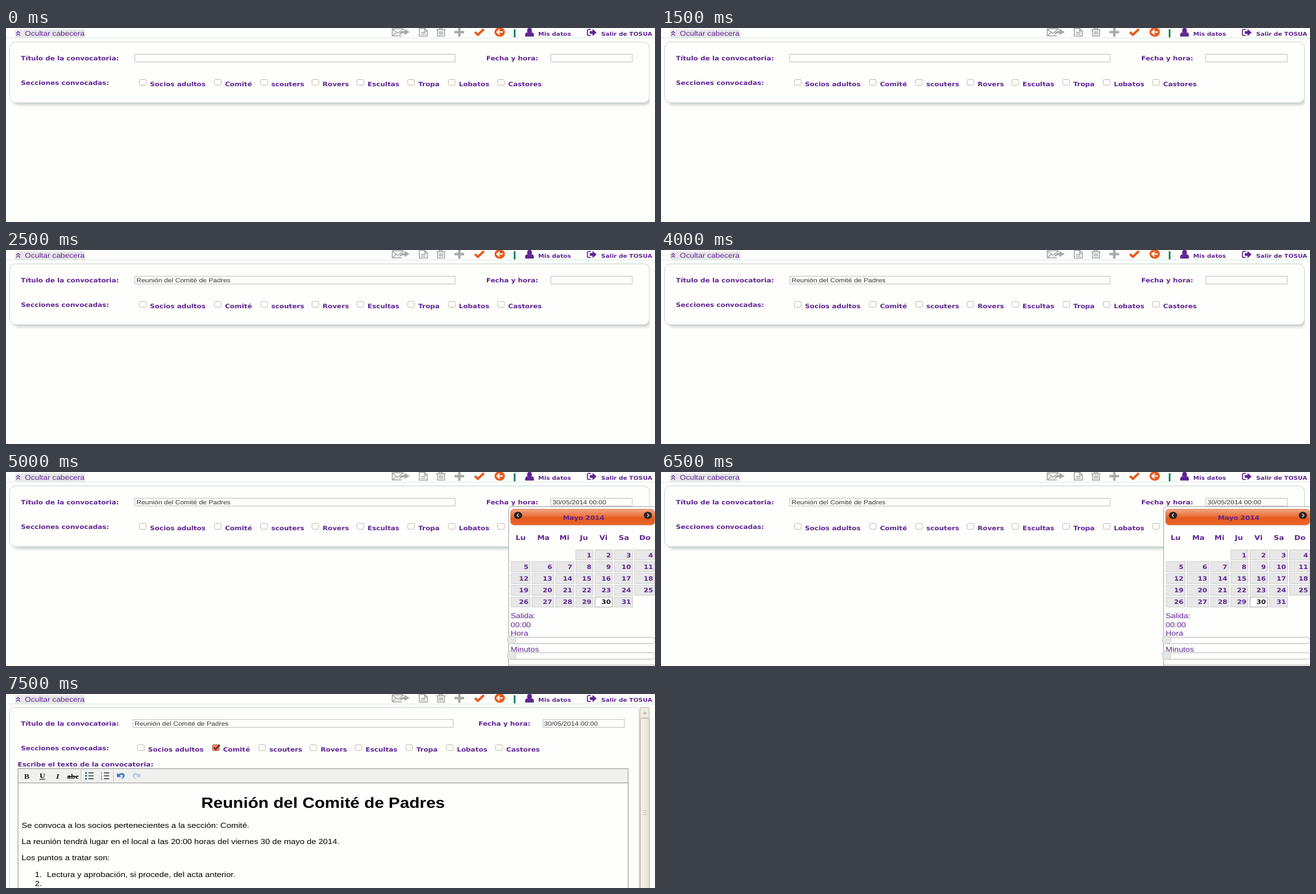
These frames come from a looping animation (1000 px wide and 300 px high, 10000 ms). An HTML page:

```html
<!DOCTYPE html>
<html lang="es">
<head>
<meta charset="utf-8">
<title>Convocatoria</title>
<style>
html, body { margin: 0; width: 100%; height: 100%; overflow: hidden; background: #fefefc; }
svg { display: block; width: 1000px; height: 300px; text-rendering: geometricPrecision; }
.lab { font: bold 10.5px "DejaVu Sans", sans-serif; fill: #5e2692; }
.nav { font: bold 9.3px "DejaVu Sans", sans-serif; fill: #5e2692; }
.th { font: bold 11.5px "DejaVu Sans", sans-serif; fill: #5e2692; }
.tab { font: 12.1px "Liberation Sans", Arial, sans-serif; fill: #5e2692; }
.val { font: 10.65px "Liberation Sans", Arial, sans-serif; fill: #333; }
.time { font: 12.5px "Liberation Sans", Arial, sans-serif; fill: #5e2692; }
.doc { font: 12.95px "Liberation Sans", Arial, sans-serif; fill: #000; }
.h1 { font: bold 26px "Liberation Sans", Arial, sans-serif; fill: #000; }
.tool { font: bold 12px "Liberation Serif", serif; fill: #111; }
.num { font: 5px "DejaVu Sans", sans-serif; fill: #2f5fc0; }
.ital { font-style: italic; }
.mid { text-anchor: middle; }
.end { text-anchor: end; }
.now { fill: #111; }
.scene { animation: 10s step-end infinite; }
#form { animation-name: form; }
#title { animation-name: title; }
#calendar { animation-name: calendar; }
#editor { animation-name: editor; }
@keyframes form { 0% { visibility: visible } 75%, 100% { visibility: hidden } }
@keyframes title { 0% { visibility: hidden } 25% { visibility: visible } 75%, 100% { visibility: hidden } }
@keyframes calendar { 0% { visibility: hidden } 50% { visibility: visible } 75%, 100% { visibility: hidden } }
@keyframes editor { 0% { visibility: hidden } 75%, 100% { visibility: visible } }
</style>
</head>
<body>
<svg viewBox="0 0 1000 300">
  <defs>
    <linearGradient id="orange" x2="0" y2="1">
      <stop offset="0" stop-color="#f3a684"/><stop offset=".45" stop-color="#ea6f3a"/>
      <stop offset=".55" stop-color="#e65a1e"/><stop offset="1" stop-color="#e8642a"/>
    </linearGradient>
    <linearGradient id="thumb">
      <stop offset="0" stop-color="#f7f4ed"/><stop offset="1" stop-color="#e6dfd2"/>
    </linearGradient>
    <filter id="blur" x="-5%" y="-20%" width="110%" height="140%"><feGaussianBlur stdDeviation="2"/></filter>
    <clipPath id="page"><rect width="992" height="300"/></clipPath>
  </defs>
  <rect width="1000" height="300" fill="#fefefc"/>

  <g>
    <path d="M0 15.5H1000" stroke="#dcefe5"/>
    <path d="M14 15V5q0-3 3-3H119q3 0 3 3V15z" fill="#e7e7e9"/>
    <path d="M15.8 8l2.9-2.7L21.6 8M15.8 11.6l2.9-2.7 2.9 2.7" fill="none" stroke="#5e2692" stroke-width="1.2"/>
    <g fill="none" stroke="#a9a9a9" stroke-width="1.5">
      <path d="M610 12.3H595.2V1.2H612V3M595.5 2l8.2 6 8-6M595.5 12l5.5-5"/>
      <path d="M636.8.5V12.5H649.2V4.5L645.2.5zM645 .5V4.8H649M639.5 6.8h7M639.5 9.5h7"/>
      <path d="M663 2.8H677.5M667.5 2.5V.6h5V2.5M665 3V12.4H675.6V3M668 5v5.5M670.3 5v5.5M672.6 5v5.5"/>
      <path d="M691 6.3H706M698.5-1V13.5" stroke-width="3.8"/>
    </g>
    <path d="M606 11q0-6 8-6.4V1.6L622 6.2l-8 4.6V8q-5 0-8 3z" fill="#a9a9a9"/>
    <path d="M722.5 6.2l4.6 4.3 9.2-8.8" fill="none" stroke="#e8591c" stroke-width="3.6"/>
    <ellipse cx="760.7" cy="6.3" rx="8" ry="7.2" fill="#e8591c"/>
    <path d="M765.5 6.3H757M760.6 2.4l-4.1 3.9 4.1 3.9" fill="none" stroke="#fff" stroke-width="2"/>
    <path d="M783.7 2V14.5" stroke="#0b8058" stroke-width="2.6"/>
    <g fill="#5e2692">
      <ellipse cx="806.7" cy="4" rx="3.7" ry="4.2"/>
      <path d="M800 13.3V10.5q0-3.8 3.4-3.8 3.3 2.4 6.6 0 3.4 0 3.4 3.8v2.8z"/>
      <path d="M899.5 4.8h4.2V1.4l6.4 5.5-6.4 5.6V9H899.5z"/>
    </g>
    <path d="M901 2.2H898q-2.2 0-2.2 2.2v5q0 2.2 2.2 2.2h3" fill="none" stroke="#5e2692" stroke-width="1.5"/>
    <g id="nav"></g>
  </g>

  <g id="form" class="scene"></g>
  <g id="title" class="scene"></g>
  <g id="calendar" class="scene"></g>
  <g id="editor" class="scene"></g>
</svg>
<script>
const aspect = .88; // the screen is shown slightly flattened
const text = (cls, x, y, s) =>
  `<text class="${cls}" transform="translate(${x} ${y}) scale(1 ${aspect})">${s}</text>`;
const rect = (x, y, w, h, fill, stroke, r = 0) =>
  `<rect x="${x}" y="${y}" width="${w}" height="${h}" rx="${r}" fill="${fill}" stroke="${stroke}"/>`;
const line = (d, stroke, w = 1) => `<path d="${d}" fill="none" stroke="${stroke}" stroke-width="${w}"/>`;
const put = (id, ...parts) => document.getElementById(id).innerHTML = parts.join('');

const paper = '#fefefc';
const heading = 'Reunión del Comité de Padres';
const date = '30/05/2014 00:00';
const sections = [['Socios adultos', 205], ['Comité', 320.7], ['scouters', 392], ['Rovers', 471],
  ['Escultas', 540.3], ['Tropa', 618.5], ['Lobatos', 681], ['Castores', 757]];

// The scrolled form sits a little further left and one pixel higher.
function fields(dx, dy, dateX, checked) {
  const boxes = sections.map(([name, x]) => {
    const on = name === checked;
    return rect(x + dx + .5, 79.5 + dy, 10.5, 9, on ? '#f08a6c' : paper, on ? '#b5563c' : '#cbbfae', 2) +
      (on ? line(`M${x + dx + 2.5} ${83.5 + dy}l3 3 6-7`, '#5a1d12', 2) : '') +
      text('lab', x + dx + 16.7, 90 + dy, name);
  });
  return text('lab', 23, 49.7 + dy, 'Título de la convocatoria:') +
    rect(198.5 + dx, 40.5 + dy, 493.5, 12, paper, '#c4c4c4') +
    text('lab', dateX, 49.7 + dy, 'Fecha y hora:') +
    rect(dateX + 99.5, 40.5 + dy, 125.5, 12, paper, '#c4c4c4') +
    text('lab', 23, 88 + dy, 'Secciones convocadas:') + boxes.join('');
}

function calendar() {
  const cols = [[778, 30], [810, 34.5], [846.5, 29], [877.5, 27.5], [907, 28], [937, 29], [968, 32]];
  const heads = [['Lu', 793], ['Ma', 828], ['Mi', 860.5], ['Ju', 890.5], ['Vi', 920.5], ['Sa', 952], ['Do', 984.5]];
  const arrow = (x, s) => `<ellipse cx="${x}" cy="67" rx="6.3" ry="5.6" fill="#222"/>` +
    line(`M${x + s} 64.3l${-2.5 * s} 2.7 ${2.5 * s} 2.7`, '#f3b090', 1.6);
  const slider = y => rect(776.5, y + .5, 224, 10, paper, '#bbb', 5) +
    rect(772.5, y - 1.5, 13, 12, '#e6e6e6', '#c6c6c6', 5);
  let days = '';
  for (let d = 1; d <= 31; d++) {
    const i = d + 2, [x, w] = cols[i % 7], y = 120.5 + 18.2 * Math.floor(i / 7), now = d === 30;
    days += rect(x + .5, y, w - 1, 15.5, now ? '#fff' : '#e8e8e8', now ? '#aaa' : '#d0d0d0') +
      text(now ? 'lab end now' : 'lab end', x + w - 3, y + 11, d);
  }
  return text('val', 842, 49.7, date) +
    rect(774.5, 53.5, 228, 260, paper, '#aaa', 5) +
    rect(777.5, 57.5, 222, 24.5, 'url(#orange)', '#d98a68', 5) +
    arrow(789, 1) + arrow(989, -1) + text('lab mid', 890, 73.7, 'Mayo 2014') +
    heads.map(([h, x]) => text('th mid', x, 104.7, h)).join('') + days +
    text('time', 777.5, 225.7, 'Salida:') + text('time', 777.5, 239.7, '00:00') +
    text('time', 777.5, 252.7, 'Hora') + slider(255) +
    text('time', 777.5, 277.7, 'Minutos') + slider(279) + line('M775 298.5H1000', '#bbb');
}

function toolbar() {
  const rows = [122, 126.5, 131];
  return rect(18.5, 115.5, 940, 200, paper, '#999') + rect(19, 116, 939, 21, '#f0f0ee', 'none') +
    line('M18 137.5H959', '#999') +
    text('tool mid', 32, 130.5, 'B') +
    text('tool mid', 56, 130, 'U') + line('M51.5 132H60.5', '#111') +
    text('tool mid ital', 79.5, 130.5, 'I') +
    text('tool mid', 103, 130.5, 'abc') + line('M94.5 127.5H111.5', '#111') +
    line('M115.5 117V136M165.5 117V136', '#ccc') +
    rows.map((y, i) => `<circle cx="123.3" cy="${y}" r="1.5" fill="#2f5fc0"/>` +
      line(`M127 ${y}H135M151 ${y}H159`, '#444', 1.4) + text('num', 145.5, y + 2, i + 1)).join('') +
    '<g id="undo"><path d="M171 122v6.5h6.5l-2.3-2.2q4.6-3.2 5 .5 0 2.6-3 4.7 5.6-1.6 5.6-5.6-1-6-9.6-1.9z" fill="#3f72cc"/></g>' +
    '<use href="#undo" transform="matrix(-1 0 0 1 378 0)" opacity=".3"/>';
}

function scrollbar() {
  return rect(976.5, 20.5, 15, 300, '#ebe5da', '#d9d2c5') +
    rect(977.5, 21.5, 13, 15, '#f1ede5', '#dcd5c9', 2) +
    '<path d="M981 31l3.5-4 3.5 4z" fill="#b9b2a6"/>' +
    rect(977.5, 37.5, 14, 290, 'url(#thumb)', '#b9b1a4', 3) +
    line('M981.5 180.5h6M981.5 183.5h6M981.5 186.5h6', '#cbc3b5');
}

put('nav',
  text('tab', 29, 12, 'Ocultar cabecera'),
  text('nav', 820, 11.5, 'Mis datos'),
  text('nav', 917, 11.5, 'Salir de TOSUA'));
put('form',
  '<g clip-path="url(#page)"><rect x="10" y="26" width="983" height="93" rx="9" fill="#9fa8a2" opacity=".55" filter="url(#blur)"/></g>',
  rect(5.5, 21.5, 986, 94, paper, '#c6dbd0', 9),
  fields(0, 0, 740));
put('title', text('val', 201, 49.7, heading));
put('calendar', calendar());
put('editor',
  line('M5.5 300V29.5q0-9 9-9H967q8.5 0 8.5 9V300', '#c6dbd0'),
  fields(-3, -1, 728, 'Comité'),
  text('val', 198, 48.7, heading),
  text('val', 829, 48.7, date),
  text('lab', 18, 112, 'Escribe el texto de la convocatoria:'),
  toolbar(),
  text('h1 mid', 488.5, 175.8, heading),
  text('doc', 24, 207, 'Se convoca a los socios pertenecientes a la sección: Comité.'),
  text('doc', 24, 232, 'La reunión tendrá lugar en el local a las 20:00 horas del viernes 30 de mayo de 2014.'),
  text('doc', 24, 257, 'Los puntos a tratar son:'),
  text('doc', 44.5, 283, '1.'),
  text('doc', 63, 283, 'Lectura y aprobación, si procede, del acta anterior.'),
  text('doc', 44.5, 297, '2.'),
  scrollbar());
</script>
</body>
</html>
```
